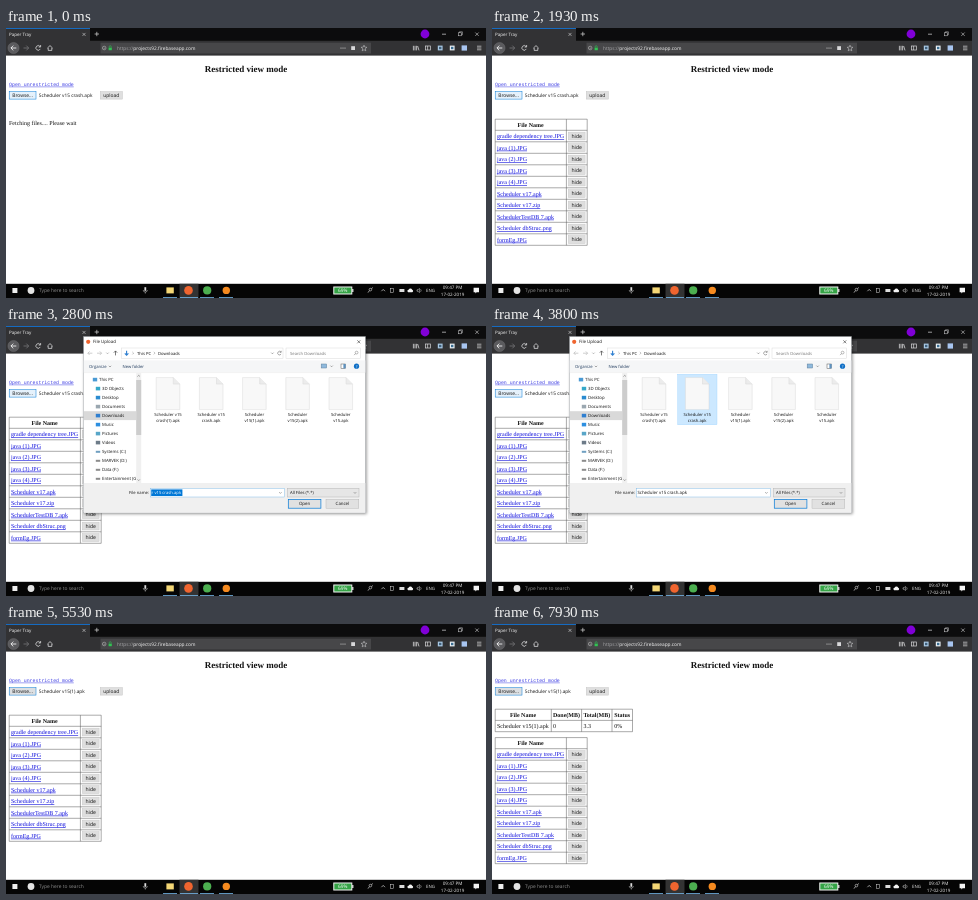
These frames come from a looping animation (480x270 px, 8000 ms). An HTML page:

```html
<!DOCTYPE html>
<html lang="en">
<head>
<meta charset="utf-8">
<title>Restricted view mode</title>
<style>
html, body { margin: 0; width: 100%; height: 100%; overflow: hidden; background: #fff; }
svg { display: block; width: 100vw; height: 100vh; }
text { font-family: "Open Sans", "Noto Sans", sans-serif; text-rendering: geometricPrecision; white-space: pre; }
.serif { font-family: "Liberation Serif", "Noto Serif", serif; }
.bold { font-weight: 700; }
.mono { font-family: "Liberation Mono", monospace; }
.link { fill: #1010dc; text-decoration: underline; }
#dialog { filter: drop-shadow(1px 1.5px 1.5px rgba(0, 0, 0, .4)); }
</style>
</head>
<body>
<svg id="stage" viewBox="0 0 480 270" xmlns="http://www.w3.org/2000/svg"></svg>
<script>
const LOOP = 8000;

// Drawing helpers; text is placed by the vertical centre of its line.
const rect = (x, y, w, h, fill, stroke = 'none', sw = 0.5) =>
  `<rect x="${x}" y="${y}" width="${w}" height="${h}" fill="${fill}" stroke="${stroke}" stroke-width="${sw}"/>`;
const disc = (x, y, r, fill, stroke = 'none', sw = 0.6) =>
  `<circle cx="${x}" cy="${y}" r="${r}" fill="${fill}" stroke="${stroke}" stroke-width="${sw}"/>`;
const line = (d, stroke, sw = 0.7, fill = 'none') =>
  `<path d="${d}" stroke="${stroke}" stroke-width="${sw}" fill="${fill}"/>`;
const label = (s, x, y, { size = 4.2, fill = '#111', anchor = 'start', cls = '', id = '' } = {}) =>
  `<text x="${x}" y="${y + size * 0.34}" font-size="${size}" fill="${fill}" text-anchor="${anchor}" class="${cls}" id="${id}">${s}</text>`;
const group = (id, body) => `<g id="${id}">${body}</g>`;
const cross = (x, y, r, color) =>
  line(`M${x - r} ${y - r}l${2 * r} ${2 * r}m0 ${-2 * r}l${-2 * r} ${2 * r}`, color, 0.6);
const down = (x, y, color = '#555') => line(`M${x - 1.2} ${y - 0.6}l1.2 1.2 1.2 -1.2`, color, 0.5);

const serif = (s, x, y, opts = {}) => label(s, x, y, { size: 6, ...opts, cls: 'serif ' + (opts.cls || '') });
const head = (s, x, y) => serif(s, x, y, { anchor: 'middle', cls: 'bold' });
const button = (s, x, y, w, h, { fill = '#e1e1e1', stroke = '#b5b5b5', sw = 0.5, size = 4.9 } = {}) =>
  rect(x, y, w, h, fill, stroke, sw) + label(s, x + w / 2, y + h / 2, { size, anchor: 'middle' });

function grid(xs, ys) {
  const [l, r, t, b] = [xs[0], xs.at(-1), ys[0], ys.at(-1)];
  return line(xs.map(x => `M${x} ${t}V${b}`).join('') + ys.map(y => `M${l} ${y}H${r}`).join(''), '#555', 0.5);
}

function browser() {
  const pale = '#d8d8da', dim = '#77777a';
  const tabs = rect(0, 0, 480, 13, '#0c0c0d') + rect(0, 0, 84, 13, '#323234') + rect(0, 0, 84, 0.7, '#0a84ff') +
    label('Paper Tray', 3, 6.4, { size: 4.5, fill: '#f5f5f5' }) +
    cross(78, 6.4, 1.5, pale) + line('M88.6 6h4.4M90.8 3.8v4.4', pale) +
    disc(419, 6, 4.4, '#8000d7') +
    line('M436 6.2h4', pale) + rect(452.4, 4.8, 3, 3, 'none', pale) + line('M453.4 4.8v-1h3v3h-1', pale, 0.5) +
    cross(471, 6.2, 1.7, pale);
  const nav = rect(0, 12.8, 480, 14.8, '#323234') + disc(7.5, 20, 5.6, '#5b5b5e', '#77777a', 0.4) +
    line('M10.3 20H5M7.3 17.6L4.9 20l2.4 2.4', '#fff', 0.8) +
    line('M17.5 20h5M20.3 17.6l2.4 2.4 -2.4 2.4', dim, 0.8) +
    line('M34.1 18.6a2.3 2.3 0 1 0 .2 2.3M34.6 17v2h-2', pale, 0.8) +
    line('M41.3 20.2l2.7-2.6 2.7 2.6M42.2 20v2.4h3.6V20', pale, 0.8);
  const address = rect(94.5, 14.7, 270.5, 10.8, '#474749') +
    disc(98.2, 20, 1.8, 'none', '#bbb') + line('M98.2 19.6v1.4', '#bbb', 0.6) +
    rect(102.6, 19.7, 3.2, 2.5, '#30c553') + line('M103.2 19.7v-1a1 1 0 0 1 2 0v1', '#30c553', 0.6) +
    label('<tspan fill="#a5a5a8">https://</tspan>projects92.firebaseapp.com', 111, 20, { size: 4.8, fill: '#f4f4f4' }) +
    [335, 337, 339].map(x => disc(x, 20, 0.6, pale)).join('') +
    rect(345.2, 18.2, 3.8, 3.8, pale) +
    line('M358 17.2l.8 1.9 2.1.2-1.6 1.4.5 2.1-1.8-1.1-1.8 1.1.5-2.1-1.6-1.4 2.1-.2z', pale, 0.5);
  const tools = line('M407.4 17.8v4.6M409 17.8v4.6M410.6 17.8v4.6M411.6 18l1.4 4.4', pale, 0.8) +
    rect(419.6, 18, 5, 4, 'none', pale, 0.7) + line('M421.6 18v4', pale, 0.7) +
    rect(431.8, 17.6, 4.8, 4.8, '#a9c9e4') + rect(433, 18.8, 2.4, 2.4, '#41617c') +
    rect(443.8, 17.6, 4.8, 4.8, '#e8eef2') + rect(445, 18.8, 2.4, 2.4, '#3a6d92') +
    rect(455.6, 17.4, 5.4, 5.2, '#a8c5f0') +
    line('M471 18.2h4.4M471 20h4.4M471 21.8h4.4', pale);
  return tabs + nav + address + tools;
}

function taskbar() {
  const pale = '#ddd', top = 255.8;
  const apps = rect(173.5, top, 19, 270 - top, '#333') +
    rect(160.4, 259.4, 7.4, 6, '#f3d675') + disc(182.5, 262.4, 4.3, '#f0652f') +
    disc(201.2, 262.4, 4.1, '#4caf50') + disc(220.3, 262.4, 3.7, '#f58a1f') +
    [157, 174, 194, 213].map(x => rect(x, 269.2, x === 174 ? 18 : 14, 0.8, '#76b9ed')).join('');
  const tray = rect(327.8, 259, 18, 7, '#35a346', '#f4f4f4', 1) + rect(346.2, 261, 1.2, 3, '#f4f4f4') +
    label('69%', 336.8, 262.5, { size: 4.8, fill: '#fff', anchor: 'middle' }) +
    disc(364.4, 261.6, 1.3, 'none', pale) + line('M362 264.6l1.4-1.9M365.4 260.6l1.4-1', pale) +
    line('M375.4 263.2l1.8-1.8 1.8 1.8', pale) +
    rect(384.4, 260.6, 3.2, 4, 'none', pale) + rect(393.4, 261, 5, 3, pale) +
    line('M402.2 264.2a1.3 1.3 0 0 1 .4-2.5 2 2 0 0 1 3.6 0 1.3 1.3 0 0 1 0 2.5z', 'none', 0, '#f4f4f4') +
    line('M411 261.8h1l1.4-1.4v4.2l-1.4-1.4h-1zM414.6 261.2q1 1.3 0 2.6', pale, 0.5) +
    label('ENG', 424.6, 262.5, { size: 4.4, fill: '#eee', anchor: 'middle' }) +
    label('09:47 PM', 446.6, 259, { size: 4.6, fill: '#eee', anchor: 'middle' }) +
    label('17-02-2019', 446.6, 266.3, { size: 4.5, fill: '#eee', anchor: 'middle' }) +
    line('M467.6 259.8h5.4v4.4h-2.4l-1.2 1.3v-1.3h-1.8z', 'none', 0, '#f4f4f4');
  return rect(0, top, 480, 270 - top, '#050505') +
    rect(6.4, 260, 5, 5, '#eee') + disc(25, 262.5, 3.4, '#e4e4e4') +
    label('Type here to search', 33, 262.8, { size: 4.9, fill: '#8f8f8f' }) +
    rect(138.4, 259.2, 1.8, 3.6, pale) + line('M137.2 262q0 2 2.1 2t2.1-2M139.3 264v1.6', pale, 0.5) +
    apps + tray;
}

function fileTable() {
  const names = ['gradle dependency tree.JPG', 'java (1).JPG', 'java (2).JPG', 'java (3).JPG', 'java (4).JPG',
    'Scheduler v17.apk', 'Scheduler v17.zip', 'SchedulerTestDB 7.apk', 'Scheduler dbStruc.png', 'formEg.JPG'];
  const pitch = 11.5, top = 102.3;
  const ys = [91.2, ...Array.from({ length: 11 }, (_, i) => top + i * pitch)];
  return grid([3.2, 74.4, 95.2], ys) + head('File Name', 38.7, 97) + names.map((name, i) => {
    const y = top + (i + 0.5) * pitch;
    return serif(name, 5, y, { cls: 'link' }) +
      button('hide', 76.3, y - 3.9, 16.8, 7.8, { fill: '#dedede', stroke: '#c8c8c8', size: 5.1 });
  }).join('');
}

function progressTable() {
  const y = 102;
  return grid([3.2, 59.3, 89.6, 120, 140.5], [85.2, 96.4, 107.7]) +
    head('File Name', 31, 91) + head('Done(MB)', 74.5, 91) + head('Total(MB)', 104.8, 91) + head('Status', 130.2, 91) +
    serif('Scheduler v15(1).apk', 5, y) + serif('0', 61, y) + serif('3.3', 91.6, y) + serif('0%', 122.2, y);
}

function page() {
  const browse = fill => button('Browse...', 3.2, 63.7, 26.8, 7.4, { fill, stroke: '#0078d7' });
  return rect(0, 27, 480, 230, '#fff') +
    serif('Restricted view mode', 240, 41, { size: 9, anchor: 'middle', cls: 'bold' }) +
    `<g opacity=".8">${label('Open unrestricted mode', 3, 56, { size: 4.92, cls: 'mono link' })}</g>` +
    group('browseHot', browse('#e5f1fb')) + group('browseIdle', browse('#dcdfe2')) +
    label('', 32.8, 67.5, { size: 4.75, id: 'chosen' }) +
    button('upload', 94.3, 63.7, 22, 7.4, { fill: '#dfdfdf', stroke: '#c4c4c4' }) +
    group('fetching', serif('Fetching files.... Please wait', 3, 95)) +
    group('files', fileTable()) + group('progress', progressTable());
}

const FILES = [['Scheduler v15', 'crash(1).apk'], ['Scheduler v15', 'crash.apk'],
  ['Scheduler', 'v15(1).apk'], ['Scheduler', 'v15(2).apk'], ['Scheduler', 'v15.apk']];
const fileX = i => 162 + i * 43.2;
const tile = (id, i, fill, stroke) => group(id, rect(fileX(i) - 19.6, 48.2, 39.4, 50.6, fill, stroke, 0.35));

function fileIcon([a, b], i) {
  const x = fileX(i);
  return line(`M${x - 11.8} 51.6h17.1l6.5 6.5v25.5h-23.6z`, '#d2d2d2', 0.4, '#f8f8f8') +
    line(`M${x + 5.3} 51.6v6.5h6.5`, '#d2d2d2', 0.4, '#ececec') +
    label(a, x, 88.2, { size: 4.2, anchor: 'middle' }) + label(b, x, 95, { size: 4.2, anchor: 'middle' });
}

function sidebar() {
  const items = [['This PC', '#4a9ad4'], ['3D Objects', '#35a8c9'], ['Desktop', '#2a8bd0'], ['Documents', '#9aa7b0'],
    ['Downloads', '#2f7fd0'], ['Music', '#2d8fe0'], ['Pictures', '#58a6c8'], ['Videos', '#6d7b88'],
    ['Systems (C:)', '#6f9fc0'], ['MARVEK (D:)', '#8b8b8b'], ['Data (F:)', '#8b8b8b'], ['Entertainment (G:)', '#8b8b8b']];
  const rows = items.map(([name, color], i) => {
    const y = 53.6 + i * 9, x = i ? 96 : 93;
    const drive = i > 7;
    return rect(x - 6.2, y - (drive ? 0.8 : 1.8), 4.4, drive ? 2 : 3.6, color) + label(name, x, y, { size: 4.3 });
  }).join('');
  return rect(78, 85.2, 52, 8.9, '#d9d9d9') +
    `<clipPath id="side"><path d="M77 47h53v110h-53z"/></clipPath><g clip-path="url(#side)">${rows}</g>` +
    rect(130.2, 47, 5, 110, '#f0f0f0') + rect(130.2, 54, 5, 55, '#cdcdcd') +
    line('M131.4 50.6l1.3-1.3 1.3 1.3', '#555', 0.5) + down(132.7, 154);
}

function dialog() {
  const grey = '#777', edge = '#d9d9d9';
  const top = rect(77.5, 10.5, 282, 176.4, '#fff', '#8a9096', 0.35) +
    disc(82.2, 15.8, 2.1, '#f0652f') + label('File Upload', 87, 15.8, { size: 4.4 }) + cross(352.8, 15.8, 1.5, '#333') +
    line('M86.4 27.2h-4.6M83.6 25.4l-1.8 1.8 1.8 1.8', '#bbb') + line('M91 27.2h4.6M93.8 25.4l1.8 1.8-1.8 1.8', '#bbb') +
    down(101.5, 27.2, grey) + line('M109.5 29.4v-4.4M107.8 26.7l1.7-1.8 1.7 1.8', '#444') +
    rect(115.4, 22, 161.6, 10.4, '#fff', edge) + line('M120.6 24.8v4.4M118.8 27.4l1.8 1.8 1.8-1.8', '#2f7fd0', 1.1) +
    line('M126.4 26l1.2 1.2-1.2 1.2M147.8 26l1.2 1.2-1.2 1.2', grey, 0.5) +
    label('This PC', 131, 27.2) + label('Downloads', 152, 27.2) + down(266.4, 27.2) +
    line('M274.9 26a1.8 1.8 0 1 0 .2 2M275.2 24.8v1.5h-1.5', '#555', 0.5) +
    rect(280, 22, 74.6, 10.4, '#fff', edge) + label('Search Downloads', 284, 27.2, { fill: grey }) +
    disc(350.6, 26.6, 1.4, 'none', grey, 0.5) + line('M349.6 27.6l-1.5 1.5', grey, 0.6) +
    rect(77.8, 34.4, 281.5, 12, '#f5f6f7') + line('M77.8 46.6h281.5', '#e3e3e3', 0.4) +
    label('Organize', 83, 40.2, { fill: '#1e395b' }) + down(104, 40.4) + label('New folder', 116.6, 40.2, { fill: '#1e395b' }) +
    rect(315.2, 38, 5.4, 4, '#8fb9dc', '#5d7f9c') + down(325.6, 40.2) +
    rect(335, 38, 4.6, 4.4, '#fff', '#555') + rect(337.4, 38, 2.2, 4.4, '#5d92c0') +
    disc(350.5, 40.2, 2.6, '#0f6fc6') + label('?', 350.5, 40.2, { size: 4, fill: '#fff', anchor: 'middle' });
  const list = tile('hover1', 1, '#e5f3ff', 'none') + tile('pick1', 1, '#cce8ff', '#99d1ff') +
    tile('hover2', 2, '#e5f3ff', 'none') + tile('pick2', 2, '#cce8ff', '#99d1ff') + FILES.map(fileIcon).join('');
  const open = (fill, sw) => button('Open', 282.3, 173.4, 32.6, 8.8, { fill, stroke: '#0078d7', sw, size: 4.4 });
  const bottom = rect(77.8, 157, 281.5, 29.6, '#f0f0f0') + label('File name:', 143, 166.8, { anchor: 'end' }) +
    rect(144.4, 162.4, 134.2, 8.6, '#fff', '#6aaee4', 0.4) + down(274.4, 166.8) +
    group('preset', rect(145.2, 163.4, 31.2, 6.6, '#0078d7') + label('r v15 crash.apk', 145.6, 166.8, { fill: '#fff' })) +
    label('', 145.4, 166.8, { id: 'typed', size: 4.4 }) +
    rect(281.4, 162.4, 71.6, 8.6, '#e6e6e6', '#b5b5b5') + label('All Files (*.*)', 284, 166.8) + down(349, 166.8) +
    group('openIdle', open('#e1e1e1', 0.7)) + group('openHot', open('#e5f1fb', 0.35)) +
    button('Cancel', 320, 173.4, 32.8, 8.8, { stroke: '#adadad', sw: 0.4, size: 4.4 });
  return top + sidebar() + list + bottom;
}

document.getElementById('stage').innerHTML = page() + browser() + taskbar() + group('dialog', dialog());

// When each part is on screen, in ms.
const OPEN = 2200, CLOSE = 5200, FADE = 120, FIRST = 3270, SECOND = 4470, UPLOAD = 7600;
const SHOWN = {
  fetching: [0, 730], files: [730, LOOP], progress: [UPLOAD, LOOP],
  browseHot: [0, CLOSE], browseIdle: [CLOSE, LOOP],
  openIdle: [0, 4800], openHot: [4800, LOOP],
  preset: [0, FIRST], hover1: [3070, FIRST], pick1: [FIRST, SECOND], hover2: [4200, SECOND], pick2: [SECOND, LOOP]
};
const el = id => document.getElementById(id);
const parts = Object.entries(SHOWN).map(([id, span]) => [el(id), ...span]);
const clamp = v => Math.min(1, Math.max(0, v));
const pane = el('dialog'), files = el('files'), chosen = el('chosen'), typed = el('typed');
const OLD = 'Scheduler v15 crash.apk', NEW = 'Scheduler v15(1).apk';

function setText(node, s) {
  if (node.textContent !== s) node.textContent = s;
}

function draw(t) {
  for (const [node, from, to] of parts) node.style.display = t >= from && t < to ? '' : 'none';
  const shade = Math.min(clamp((t - OPEN) / FADE), clamp(1 - (t - CLOSE) / FADE));
  pane.style.display = shade > 0 ? '' : 'none';
  pane.style.opacity = shade;
  files.setAttribute('transform', `translate(0 ${t >= UPLOAD ? 22.4 : 0})`);
  setText(chosen, t < CLOSE ? OLD : NEW);
  setText(typed, t < FIRST ? '' : t < SECOND ? OLD : NEW);
}

const start = performance.now();
function tick() {
  draw((performance.now() - start) % LOOP);
  requestAnimationFrame(tick);
}
tick();
</script>
</body>
</html>
```
